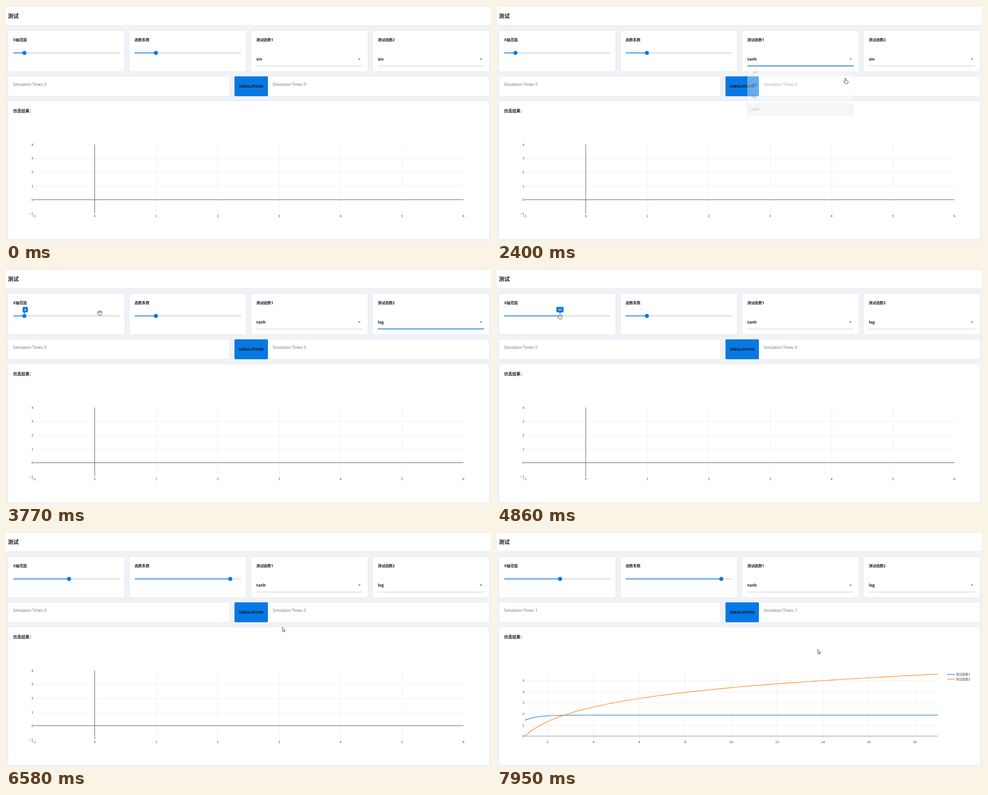
Animation, 1074 px wide and 521 px high, one loop 8 s. Source, as an HTML page:

```html
<!DOCTYPE html>
<html lang="zh">
<head>
<meta charset="utf-8">
<style>
html, body { margin: 0; width: 100%; height: 100%; overflow: hidden; background: #f0f2f7; }
svg { display: block; width: 1074px; height: 521px; }
text { font-family: "Open Sans", "Noto Sans CJK SC", "Noto Sans CJK", sans-serif; fill: #1d1f24; white-space: pre; }
.b { font-weight: 700; }
.grey { font-size: 8.15px; fill: #666; }
.tick { font: 6.8px "DejaVu Sans", "Noto Sans CJK SC", "Noto Sans CJK", sans-serif; fill: #444; }
.card { fill: #fff; filter: drop-shadow(0 .5px 1.3px rgba(40, 50, 70, .12)); }
.menu { filter: drop-shadow(0 .7px 1px rgba(0, 0, 0, .35)); }
.grid { shape-rendering: crispEdges; stroke: #eee; }
.cursor { fill: #fff; stroke: #333; stroke-width: .9; stroke-linejoin: round; }
</style>
</head>
<body>
<svg id="stage" viewBox="0 0 1074 521"></svg>
<script>
const LOOP = 8000, BLUE = '#0678e4';
const stage = document.getElementById('stage');
const $ = id => document.getElementById(id);
const set = (id, attrs) => { for (const k in attrs) $(id).setAttribute(k, attrs[k]); };

// Markup helpers
const text = (x, y, s, size, cls = '', extra = '') =>
  `<text x="${x}" y="${y}" class="${cls}" ${size ? `font-size="${size}"` : ''} ${extra}>${s}</text>`;
const rect = (x, y, w, h, attrs) => `<rect x="${x}" y="${y}" width="${w}" height="${h}" ${attrs}/>`;
const card = (x, y, w, h) => rect(x, y, w, h, 'rx="2.5" class="card"');
const line = (x1, y1, x2, y2, attrs = '') => `<path d="M${x1} ${y1}L${x2} ${y2}" ${attrs}/>`;
const half = v => Math.floor(v) + .5;
const mid = 'text-anchor="middle"', end = 'text-anchor="end"';
const minus = n => String(n).replace('-', '−');

function slider(n, x) {
  return rect(x, 103.2, 235, 1.6, 'fill="#c3cdd2"') +
    rect(x, 103.2, 0, 1.6, `id="fill${n}" fill="${BLUE}"`) +
    `<circle id="thumb${n}" cy="104" r="4.5" fill="${BLUE}"/>
    <g id="pin${n}" fill="${BLUE}"><path d="M-3 -8.5H3L0 -5.2Z"/><g id="tag${n}">` +
    `<rect id="box${n}" y="-20" height="12" rx="1.8"/>` +
    text(0, -11.3, '', 7, 'b', `id="num${n}" ${mid} style="fill:#fff"`) + '</g></g>';
}

function select(n, x) {
  return text(x, 121.2, '', 8.9, 'b', `id="pick${n}"`) +
    `<path id="arrow${n}" d="M-2.9 -1.4H2.9L0 1.5Z" fill="#757575"/>` +
    rect(x, 132.7, 235, .8, `id="base${n}"`) +
    `<rect id="line${n}" y="132" height="1.6" fill="${BLUE}"/>`;
}

function menu(n, x) {
  return `<g id="menu${n}" class="menu">` + rect(x, 134, 235.5, 108.5, 'rx="1.5" fill="#fff"') +
    rect(x, 0, 235.5, 27.2, `id="hover${n}" fill="#eaeaea"`) +
    ['_sin', 'cos', 'log', 'tanh'].map((s, i) =>
      text(x + 9, 150 + i * 27.2, s, 8.2, '', 'style="fill:#444"')).join('') + '</g>';
}

function emptyPlot() {
  let g = '', t = '';
  for (let i = -1; i <= 6; i++) {
    const x = 197 + i * 136;
    if (i > 0 && i < 6) g += line(half(x), 307, half(x), 460);
    t += text(x, 467.5, minus(i), 0, 'tick', mid);
  }
  for (let i = -1; i <= 4; i++) {
    const y = 429.7 - i * 30.55;
    if (i > 0 && i < 4) g += line(61, half(y), 1013, half(y));
    t += text(60.5, y + 2.4, minus(i), 0, 'tick', end);
  }
  g += line(196.5, 307, 196.5, 460, 'stroke="#555"') + line(61, 429.5, 1013, 429.5, 'stroke="#555"');
  return `<g id="empty"><g class="grid">${g}</g>${t}</g>`;
}

function resultPlot() {
  const px = v => 61.2 + (v - 1) * 50.82, py = v => 452.7 - v * 24.58;
  const curve = (f, color) => {
    let d = 'M';
    for (let x = 1; x <= 19; x += .25) d += `${px(x).toFixed(1)} ${py(f(x)).toFixed(1)} `;
    return `<path d="${d}" fill="none" stroke="${color}" stroke-width="1.25"/>`;
  };
  let g = '', t = '';
  for (let i = 2; i <= 18; i += 2) {
    g += line(half(px(i)), 307, half(px(i)), 460);
    t += text(px(i), 467.5, i, 0, 'tick', mid);
  }
  for (let i = 0; i <= 5; i++) {
    g += line(61, half(py(i)), 976, half(py(i)), i ? '' : 'stroke="#888"');
    t += text(60.5, py(i) + 2.4, i, 0, 'tick', end);
  }
  const colors = ['#1f77b4', '#ff7f0e'];
  const key = colors.map((c, i) => line(997, 315.6 + i * 10.8, 1014, 315.6 + i * 10.8,
    `stroke="${c}" stroke-width="1.25"`) + text(1016.5, 318.1 + i * 10.8, '测试函数' + (i + 1), 0, 'tick')).join('');
  return `<g id="result"><g class="grid">${g}</g>${t}` +
    curve(x => 1.9 * Math.tanh(x), colors[0]) + curve(x => 1.9 * Math.log(x), colors[1]) + key + '</g>';
}

const lefts = [4.5, 273.6, 542.9, 812];
stage.innerHTML =
  rect(0, 0, 1074, 521, 'fill="#f0f2f7"') +
  rect(-4, 0, 1082, 42.7, 'class="card"') + rect(0, 0, 1074, 1, 'fill="#dfe0e2"') +
  text(4, 26.9, '测试', 12, 'b') +
  ['X轴范围', '函数系数', '测试函数1', '测试函数2'].map((s, i) =>
    card(lefts[i], 55, 258, 90) + text(lefts[i] + 11.3, 77.6, s, 8.2, 'b')).join('') +
  slider(1, 16) + slider(2, 285) + select(1, 554.3) + select(2, 823.4) +
  card(4.5, 156, 490, 44) + card(506, 156, 564, 44) +
  rect(506, 156, 74, 44, `rx="2" fill="${BLUE}"`) +
  text(542.8, 180.6, 'SIMULATION!', 8.3, 'b', mid + ' style="fill:#0c1220"') +
  text(15.7, 176.8, '', 0, 'grey', 'id="count1"') + text(590.7, 176.8, '', 0, 'grey', 'id="count2"') +
  card(4.5, 211, 1065.5, 306) + text(15.7, 235.5, '仿真结果：', 9, 'b') +
  emptyPlot() + resultPlot() + menu(1, 554.3) + menu(2, 823.4) +
  `<g id="cursor" class="cursor">
    <path id="point" d="M0 0V9L2 7.2 3.4 10.4 4.8 9.8 3.5 6.8H6.2Z"/>
    <path id="hand" d="M-1 1Q-1 0 0 0Q1 0 1 1V5L4.4 5.8Q6 6.3 5.8 8L5 12.3H-1L-4 8Q-4.6 6.7 -3 6.8L-1 8.2Z"/>
    <path id="grab" d="M-3 1L-4.3 -2.2Q-4.2 -3.6 -2.8 -3L-2.4 -4.2Q-1.5 -5.4 -.5 -4.5Q.6 -5.8 1.6 -4.4Q3 -5 3.3 -3.5Q4.8 -3.6 4.6 -2L4.2 2L3 5H-1.8L-4.8 1.2Q-5 -.3 -3 1ZM-1.5 -3V-.6M.6 -3.6V-.6M2.6 -3V-.6"/>
  </g>`;

// Timing helpers
const out = p => 1 - (1 - Math.min(1, Math.max(0, p))) ** 3;
const during = (t, a, b, d) => out((t - a) / d) - out((t - b) / d);
function along(t, keys) {
  const i = keys.findIndex(k => k[0] > t);
  if (i === 0) return keys[0].slice(1);
  if (i < 0) return keys[keys.length - 1].slice(1);
  const a = keys[i - 1], b = keys[i], p = (t - a[0]) / (b[0] - a[0]);
  return a.slice(1).map((v, j) => v + (b[j + 1] - v) * p);
}

// time, x, y
const path = [
  [70, 1039, 501], [300, 930, 350], [600, 740, 160], [850, 673, 117], [950, 673, 119],
  [1130, 674.5, 233.5], [1300, 675, 237], [1650, 676, 228], [2260, 677, 226],
  [2400, 771, 160], [2620, 930, 116], [2740, 930, 118], [2890, 930, 198], [3080, 928, 198],
  [3400, 620, 140], [3620, 330, 108], [3770, 208, 97.5], [4080, 41, 106], [4265, 41, 106],
  [4850, 139.5, 106], [5060, 141, 106], [5330, 332, 105], [5400, 332, 105],
  [5700, 480, 106], [5940, 494.5, 109.5], [6020, 496, 111], [6250, 545, 176], [6420, 546, 178],
  [6820, 710.3, 260.5]];
const shapes = [[0, 'point'], [700, 'hand'], [3110, 'point'], [3600, 'grab'], [5100, 'point'],
  [5280, 'grab'], [5880, 'point'], [6150, 'hand'], [6480, 'point']];
const drag1 = [[4265, 40.8], [4850, 139.6]];
const drag2 = [[5400, 332], [5700, 480], [5940, 495], [6010, 496.6]];

function drawSlider(n, left, x, label, shown, pressed) {
  const w = 7.5 + label.length * 4.2;
  set('fill' + n, { width: x - left });
  set('thumb' + n, { cx: x, r: 4.5 * (1 - pressed) });
  set('pin' + n, { transform: `translate(${x} 104) scale(${shown})`, opacity: shown });
  set('box' + n, { x: -w / 2, width: w });
  set('tag' + n, { transform: `translate(${(.5 - (x - left) / 235) * w * .38} 0)` });
  $('num' + n).textContent = label;
}

function drawSelect(n, left, value, focus, open, shown, row) {
  const w = 235.5 * focus;
  $('pick' + n).textContent = value;
  set('line' + n, { x: left + 117.7 - w / 2, width: w });
  set('base' + n, { fill: focus > 0 && focus < 1 && open > 0 ? '#777' : '#bbb' });
  set('arrow' + n, { transform: `translate(${left + 228.4} 118) rotate(${180 * open})` });
  set('menu' + n, { opacity: shown });
  set('hover' + n, { y: 134 + Math.max(0, row) * 27.2, opacity: row < 0 ? 0 : 1 });
}

function draw(t) {
  const [x1] = along(t, drag1), [x2] = along(t, drag2);
  drawSlider(1, 16, x1, String(Math.round(1 + (x1 - 16) / 235 * 19)),
    during(t, 3590, 4940, 160), during(t, 4265, 4870, 160));
  drawSlider(2, 285, x2, (1 + (x2 - 285) / 235).toFixed(1),
    during(t, 5270, 6030, 160), during(t, 5390, 6030, 160));
  drawSelect(1, 554.3, t < 2290 ? 'sin' : 'tanh', during(t, 948, 2680, 360),
    during(t, 930, 2310, 280), during(t, 1015, 2320, 300), t < 1160 ? -1 : 3);
  drawSelect(2, 823.4, t < 3060 ? 'sin' : 'log', during(t, 2680, 4265, 360),
    during(t, 2670, 3080, 280), during(t, 2740, 3090, 300), t < 2880 ? -1 : 2);
  for (const id of ['count1', 'count2']) $(id).textContent = 'Simulation Times: ' + (t < 7270 ? 0 : 1);
  set('empty', { visibility: t < 7730 ? 'visible' : 'hidden' });
  set('result', { visibility: t < 7730 ? 'hidden' : 'visible' });
  const shape = shapes.filter(s => s[0] <= t).pop()[1];
  for (const id of ['point', 'hand', 'grab']) set(id, { display: id === shape ? 'inline' : 'none' });
  set('cursor', { transform: `translate(${along(t, path)})`, opacity: t < 70 ? 0 : 1 });
}

const start = performance.now();
function tick() {
  draw((performance.now() - start) % LOOP);
  requestAnimationFrame(tick);
}
tick();
</script>
</body>
</html>
```
